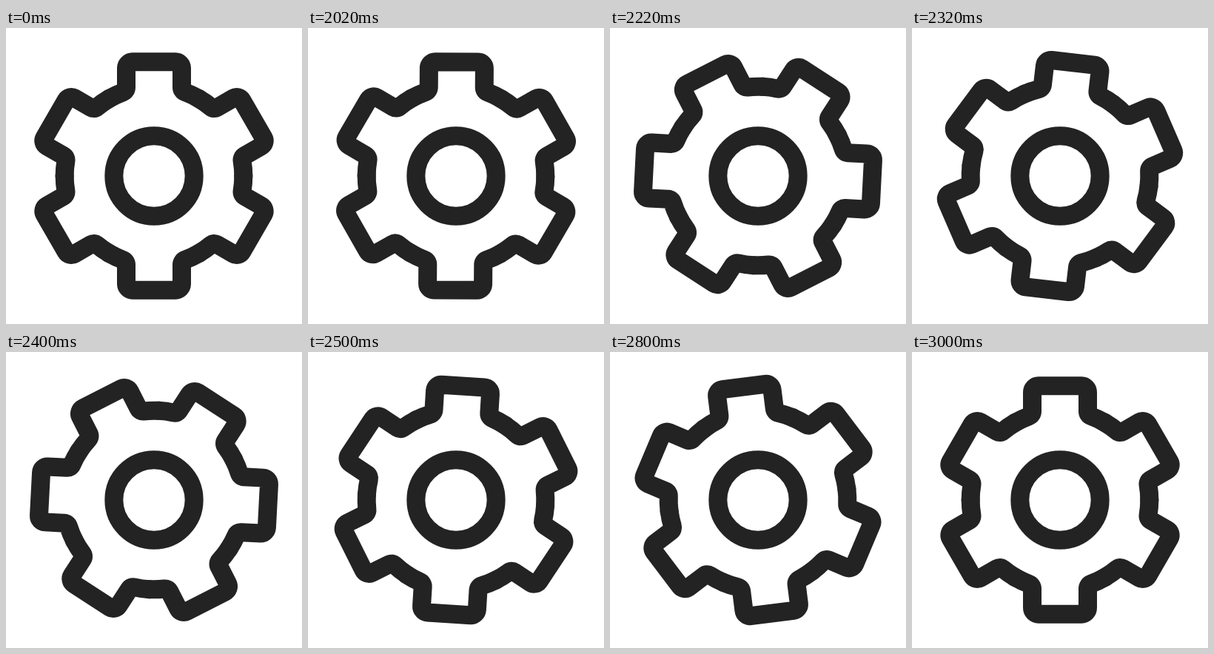
Animation of 400 by 400 pixels, one loop 3020 ms. Source, as an HTML page:

```html
<!DOCTYPE html>
<html lang="en">
<head>
<meta charset="utf-8">
<title>Settings gear</title>
<style>
  html, body { margin: 0; width: 100%; height: 100%; overflow: hidden; background: #fff; }
  svg { display: block; width: 100%; height: 100%; fill: none; stroke: #232323; stroke-width: 1.5; stroke-linecap: round; }
</style>
</head>
<body>
<svg viewBox="-12 -12 24 24">
  <circle r="3.25"/>
  <g id="gear">
    <path id="tooth" d="M-3.625-6.279A7.25 7.25 0 0 1-2.511-6.801A.4.4 0 0 0-2.25-7.176V-8.75A.5.5 0 0 1-1.75-9.25H1.75A.5.5 0 0 1 2.25-8.75V-7.176A.4.4 0 0 0 2.511-6.801A7.25 7.25 0 0 1 3.625-6.279"/>
    <use href="#tooth" transform="rotate(60)"/>
    <use href="#tooth" transform="rotate(120)"/>
    <use href="#tooth" transform="rotate(180)"/>
    <use href="#tooth" transform="rotate(240)"/>
    <use href="#tooth" transform="rotate(300)"/>
  </g>
</svg>
<script>
  const LOOP = 3020, TURN_START = 1995, STEP = 25, STEPS = 40;
  const gear = document.getElementById('gear');

  // cubic-bezier(.33, 0, .38, 1), solved by bisection
  function ease(x) {
    if (x <= 0 || x >= 1) return x <= 0 ? 0 : 1;
    let lo = 0, hi = 1, s;
    for (let i = 0; i < 24; i++) {
      s = (lo + hi) / 2;
      const bx = 3 * (1 - s) * s * ((1 - s) * 0.33 + s * 0.38) + s ** 3;
      if (bx < x) lo = s; else hi = s;
    }
    return s * s * (3 - 2 * s);
  }

  // Rests, then makes a half turn at 40 steps per second
  function draw() {
    const t = performance.now() % LOOP;
    const step = Math.floor((t - TURN_START) / STEP);
    gear.setAttribute('transform', `rotate(${180 * ease(step / STEPS)})`);
    requestAnimationFrame(draw);
  }
  draw();
</script>
</body>
</html>
```
